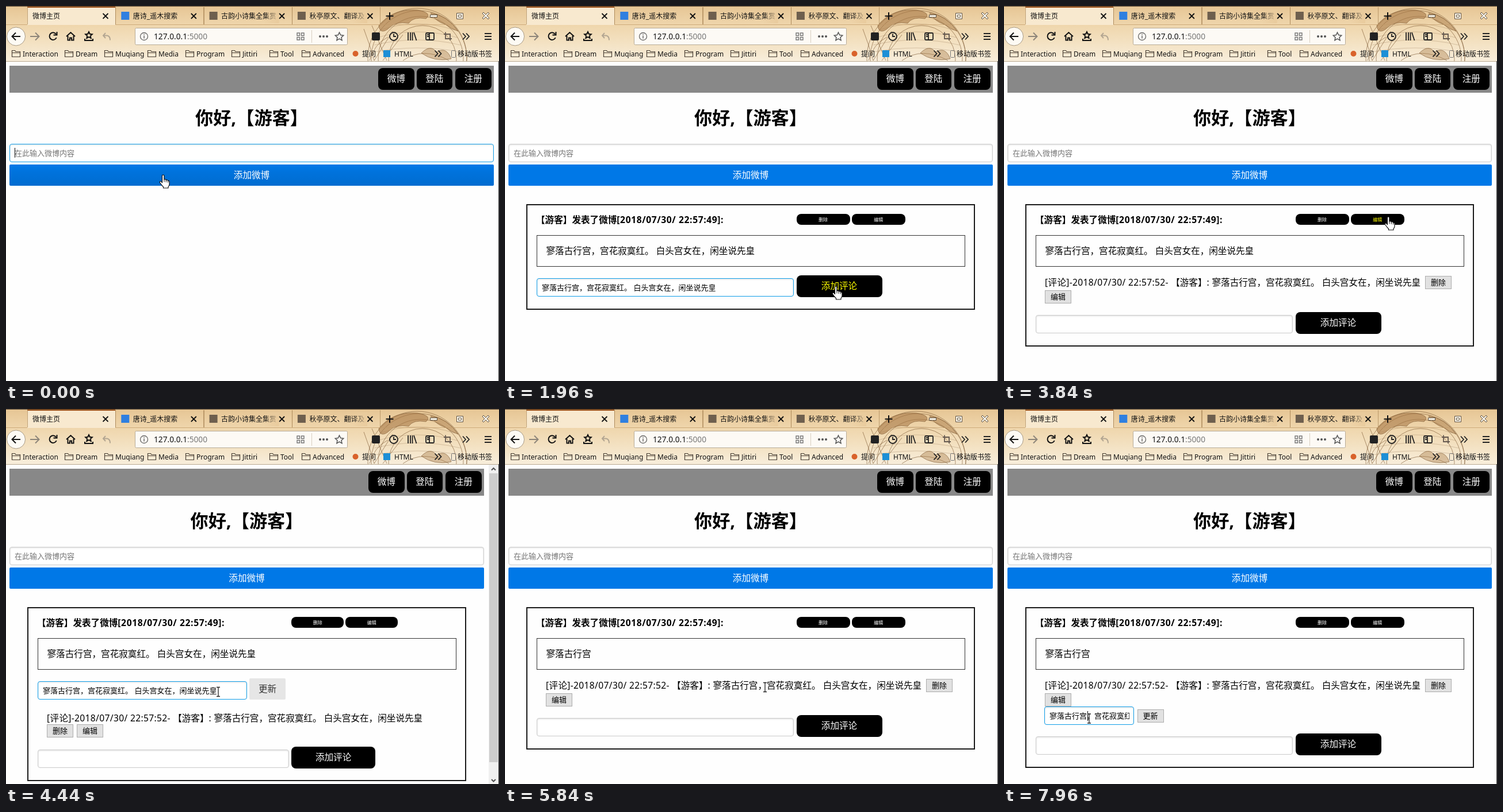
These frames come from a looping animation (857 by 653 pixels, 8 s). An HTML page:

```html
<!DOCTYPE html>
<html lang="zh-CN">
<head>
<meta charset="utf-8">
<title>微博主页</title>
<style>
html, body { margin: 0; width: 100%; height: 100%; overflow: hidden; background: #fefefe; }
body {
  position: relative; color: #000; text-spacing-trim: space-all;
  font: 15.6px "Noto Sans", "Noto Sans CJK SC", sans-serif;
}
#bar, #page, #page div, #cursor { position: absolute; box-sizing: border-box; }
#bar { left: 0; top: 0; }
#bar text { font-size: 12px; }
#page { --w: 745px; --s: 0px; --f: 0px; inset: 0; white-space: pre; }
#page .layer { inset: 0; }
#page.edit { --w: 728px; --s: -17px; }
#page.comment { --f: 64px; }
#page.comment.edit { --f: 119px; }
#page.comment.reply { --f: 96px; }

.wide { left: 6px; width: calc(842px + var(--s)); }
.btn { text-align: center; }
.black { background: #000; color: #fff; border-radius: 8px; height: 37.5px; line-height: 37px; }
.black.hover { color: #ff0; }
.menu { top: 108px; width: 62.5px; }
.mini { top: 361.5px; width: calc(var(--w) * .125); height: 19.5px; line-height: 19px; font-size: 8px; }
.field {
  height: 32px; line-height: 30px; padding-left: 8px; font-size: 13px; overflow: hidden;
  background: #fff; border: 1px solid #ccc; border-radius: 4px; box-shadow: inset 0 1px 3px #ddd;
}
.field.focus { border-color: #129fea; }
.grey {
  width: 46px; height: 23px; line-height: 20px; font-size: 13px;
  background: #e1e1e1; border: 1px solid #adadad;
}
.caret { width: 1px; height: 17px; background: #000; }
.sel { background: #0078d7; color: #fff; }

#nav { top: 104px; height: 47px; background: #888; }
#hello { top: 172px; height: 44px; line-height: 44px; font-size: 31.2px; font-weight: 700; text-align: center; }
#main { top: 239.5px; color: #757575; }
#add { top: 276px; height: 37px; line-height: 37px; color: #fff; background: #0078e7; border-radius: 2px; }
#add.hot { background-image: linear-gradient(transparent, rgba(0,0,0,.05) 40%, rgba(0,0,0,.1)); }
#card { left: 37px; top: 345px; width: calc(var(--w) + 35px); height: calc(184px + var(--f)); border: 2px solid #1a1a1a; }
#head { left: 54px; top: 360px; line-height: 25px; font-weight: 700; }
#head span { letter-spacing: .6px; }
#body { left: 55px; top: 399px; width: var(--w); height: 55px; line-height: 53px; padding-left: 15.5px; border: 1px solid #333; }
#note { left: 71px; top: 469px; line-height: 25px; }
#note span { letter-spacing: .33px; }
.edit #note { top: 525.5px; }
#del { left: 732px; top: 470px; }
#mod { left: 71px; top: 494.5px; }
.edit #del { left: 71px; top: 549px; }
.edit #mod { left: 123px; top: 549px; }
#say { left: 55px; top: calc(474px + var(--f)); width: calc(var(--w) * .6); }
#send { left: calc(59.5px + var(--w) * .6); top: calc(469px + var(--f)); width: calc(var(--w) * .2); }
#text { left: 55px; top: 474px; width: calc(var(--w) * .5); }
#save { left: 423px; top: 469px; width: 63px; height: 37px; line-height: 37px; background: #e6e6e6; color: #333; border-radius: 2px; }
#answer { left: 70px; top: 518px; width: 156px; }
#answer span { display: block; width: 139px; overflow: hidden; }
#keep { left: 231.5px; top: 523px; }
#scroll { left: 839px; top: 97px; width: 17px; height: 556px; background: #f0f0f0; }
#thumb { left: 1px; top: 15px; width: 15px; height: 503px; background: #cdcdcd; }
#scroll svg { position: absolute; left: 0; top: 0; }
#edge { left: 856px; top: 96px; width: 1px; height: 557px; background: #3b3b3b; }

#cursor { left: 0; top: 0; width: 30px; height: 30px; overflow: visible; }
#cursor g { display: none; }
#cursor.a .a, #cursor.h .h, #cursor.i .i { display: block; }
[hidden] { display: none !important; }
</style>
</head>
<body>
<svg id="bar" width="857" height="97" fill="none" stroke="none">
  <defs>
    <linearGradient id="paper" x2="0" y2="1">
      <stop stop-color="#e6c594"/><stop offset=".34" stop-color="#efd6ac"/>
      <stop offset=".7" stop-color="#f4e3c5"/><stop offset="1" stop-color="#f8eedc"/>
    </linearGradient>
    <linearGradient id="fade">
      <stop stop-color="#e9cb9d" stop-opacity="0"/><stop offset="1" stop-color="#e9cb9d"/>
    </linearGradient>
  </defs>
  <rect width="857" height="97" fill="url(#paper)"/>
  <g id="globe" stroke="#7a5530" stroke-opacity=".6">
    <path d="M648 34Q672 4 715 7Q742 12 730 22Q708 18 700 30Q676 26 664 40Q650 50 648 34Z" fill="#a87a48" fill-opacity=".6"/>
    <path d="M738 12Q768 16 786 44Q774 40 764 32Q748 28 738 12Z" fill="#a87a48" fill-opacity=".5"/>
    <path d="M622 40Q632 66 640 95M636 34L662 95M632 95Q640 66 664 54M640 95L672 44M655 95L690 50M690 95Q725 70 770 95"/>
    <path d="M722 82Q738 66 748 80Q766 70 774 92Q744 98 722 82Z" fill="#a87a48" fill-opacity=".4"/>
  </g>
  <rect y="0" width="857" height="1" fill="#5a4630"/>
  <rect x="37" y="1" width="153" height="32" fill="#f8e9cf"/>
  <rect x="37" y="1" width="153" height="2" fill="#a0561f"/>
  <path d="M0 32.5H37M190 32.5H857" stroke="#c09a68" stroke-opacity=".7"/>
  <g id="tabs"></g>
  <path d="M667 11v13M660.500 17.500h13" stroke="#111" stroke-width="2"/>
  <g stroke="#5c5043" fill="#fff8ea">
    <rect x="737.5" y="15.500" width="12" height="4"/>
    <path d="M783.500 12.500h11v10h-11zM786.500 15.500h5v4h-5z"/>
    <path d="M828 13l2-2 4 4 4-4 2 2-4 4 4 4-2 2-4-4-4 4-2-2 4-4z"/>
  </g>
  <circle cx="17.500" cy="53" r="16" fill="#fdfaf4" stroke="#a89a85"/>
  <g stroke="#111" stroke-width="2">
    <path d="M25 53H11M17 46.500L10.500 53l6.500 6.500"/>
    <path d="M42 53h14M51 46.500l6.500 6.500-6.500 6.500" stroke="#8d8579"/>
    <path d="M87 49a6.300 6.300 0 1 0 .7 6M88.500 45v5.500h-6"/>
    <path d="M105 53l7.500-7 7.500 7M107.500 52v7.500h3.500v-4h3v4h3.500V52"/>
    <path d="M137 57v3h14v-3"/>
    <path d="M144 45l1.800 3.700 4 .5-3 2.800.8 4-3.600-2-3.600 2 .8-4-3-2.800 4-.5z"/>
    <path d="M173 47l-4 4.500 4 4.500M170 51.500h6q5 1 5 8" stroke="#b3a692"/>
  </g>
  <rect x="224.500" y="38.500" width="369" height="29" rx="2" fill="#fdfaf5" stroke="#b7ab98"/>
  <circle cx="240" cy="53" r="6.500" stroke="#666" stroke-width="1.300"/>
  <path d="M240 51.500v5M240 48.700v1.500" stroke="#666" stroke-width="1.500"/>
  <text x="257" y="58" fill="#111" style="font-size:13.7px">127.0.0.1<tspan fill="#777">:5000</tspan></text>
  <path d="M506 47h4.500v4.500H506zM513.500 47h4.500v4.500h-4.500zM506 54.500h4.500V59H506zM513.500 54.500h4.500V59h-4.500z" stroke="#777" stroke-width="1.400"/>
  <path d="M531.500 42v22" stroke="#d8cfc0"/>
  <g fill="#555"><circle cx="546" cy="53" r="2"/><circle cx="552" cy="53" r="2"/><circle cx="558" cy="53" r="2"/></g>
  <path d="M579.500 46l2.200 4.600 5 .6-3.700 3.500 1 5-4.500-2.500-4.500 2.500 1-5-3.700-3.500 5-.6z" stroke="#555" stroke-width="1.500"/>
  <rect x="636" y="46" width="14" height="14" rx="2" fill="#222"/>
  <g stroke="#222" stroke-width="1.800">
    <circle cx="674" cy="53" r="7"/><path d="M674 48.500V53h4"/>
    <path d="M699 46v14M703 46v14M706.500 46v14M709 46l4.500 14"/>
    <rect x="730" y="47" width="14" height="12" rx="1.500"/><path d="M736 47v12M732 50h3M732 53h3"/>
    <path d="M764 45.500V57h11M761 49h11v11" stroke="#665a50"/>
    <path d="M794 47.500l5 5.500-5 5.500M800 47.500l5 5.500-5 5.500M832 48h12M832 53h12M832 58h12"/>
    <path d="M745.500 77.500l5 5.500-5 5.500M751.500 77.500l5 5.500-5 5.500"/>
  </g>
  <g id="marks" fill="#111"></g>
  <circle cx="607.500" cy="83" r="5" fill="#d9622b"/>
  <rect x="656" y="77" width="12" height="12" fill="#1d8fd6"/>
  <rect x="774.500" y="77.500" width="7" height="12" rx="1" stroke="#777"/>
  <path d="M0 96.500H857" stroke="#b9a98f"/>
</svg>

<div id="page">
  <div id="nav" class="wide"></div>
  <div class="btn black menu" style="left:calc(647px + var(--s))">微博</div>
  <div class="btn black menu" style="left:calc(713.5px + var(--s))">登陆</div>
  <div class="btn black menu" style="left:calc(781px + var(--s))">注册</div>
  <div id="hello" class="wide">你好,【游客】</div>
  <div id="main" class="wide field">在此输入微博内容</div>
  <div id="mainCaret" class="caret" style="left:15px;top:247px"></div>
  <div id="add" class="wide btn">添加微博</div>
  <div id="post" class="layer">
    <div id="card"></div>
    <div id="head">【游客】发表了微博<span>[2018/07/30/ 22:57:49]:</span></div>
    <div class="btn black mini" style="left:calc(59.5px + var(--w) * .6)">删除</div>
    <div id="change" class="btn black mini" style="left:calc(62.5px + var(--w) * .725)">编辑</div>
    <div id="body"></div>
    <div id="editor" class="layer">
      <div id="text" class="field"><span></span><span class="sel"></span></div>
      <div id="save" class="btn">更新</div>
    </div>
    <div id="reply" class="layer">
      <div id="note"></div>
      <div id="del" class="btn grey">删除</div>
      <div id="mod" class="btn grey">编辑</div>
    </div>
    <div id="fix" class="layer">
      <div id="answer" class="field"><span></span></div>
      <div id="fixCaret" class="caret" style="left:145px;top:526px"></div>
      <div id="keep" class="btn grey">更新</div>
    </div>
    <div id="say" class="field"></div>
    <div id="send" class="btn black">添加评论</div>
  </div>
  <div id="scroll">
    <div id="thumb"></div>
    <svg width="17" height="556" fill="none" stroke="#505050" stroke-width="2"><path d="M5 9.500l3.500-3.500 3.500 3.500M5 548l3.500 3.500 3.500-3.500"/></svg>
  </div>
  <div id="edge"></div>
</div>

<svg id="cursor">
  <g class="a"><path d="M.5.5v16l3.700-3.400 2.500 5.600 2.300-1-2.500-5.500h5z" fill="#fff" stroke="#222"/></g>
  <g class="h"><path d="M-1.500 14V2q0-2 1.700-2t1.700 2v6q3-.8 3.300 1 3-.6 3.200 1.200 2.600-.3 2.600 1.800v4.500q0 2-2 4.500V23H.5v-2q-3-3-6-7.500-.8-1.700.8-2.200 1.600-.3 3.200 2.700z" fill="#fff" stroke="#111" stroke-width="1.200"/><path d="M2 8v4.500M5.300 9v4M8.500 10.500v3" stroke="#111"/></g>
  <g class="i"><path d="M-3-7.500h2.500l.5.500.5-.5H3M-3 8.500h2.500L0 8l.5.500H3M0-7V8" fill="none" stroke="#222" stroke-width="1.300"/></g>
</svg>

<script>
const $ = id => document.getElementById(id);
const first = '寥落古行宫';
const poem = first + '，宫花寂寞红。 白头宫女在，闲坐说先皇';
const label = (x, y, s) => `<text x="${x}" y="${y}" fill="#111">${s}</text>`;

// Browser bar
const tabs = ['微博主页', '唐诗_遥木搜索', '古韵小诗集全集赏', '秋亭原文、翻译及'];
const icons = ['', '#2f7fe0', '#6e5f4e', '#6e5f4e'];
$('tabs').innerHTML = tabs.map((name, i) => {
  const x = 37 + i * 153.3;
  const icon = i ? `<rect x="${x + 10}" y="10" width="14" height="14" fill="${icons[i]}"/>` : '';
  const fade = i > 1 ? `<rect x="${x + 105}" y="6" width="26" height="24" fill="url(#fade)"/>` : '';
  return icon + label(x + (i ? 30.5 : 9), 21.5, name) + fade +
    `<path d="M${x + 131.5} 13l9 9m0-9l-9 9" stroke="#111" stroke-width="1.8"/>` +
    `<path d="M${Math.round(x) + .5} 2v30m153 0v-30" stroke="#a98556" stroke-opacity=".7"/>`;
}).join('');

const marks = [[9, 'Interaction'], [101, 'Dream'], [170, 'Muqiang'], [245, 'Media'],
  [311, 'Program'], [391, 'Jittiri'], [457, 'Tool'], [513, 'Advanced']];
$('marks').innerHTML = marks.map(([x, name]) =>
  `<path d="M${x + 1.5} 88.5v-11h5l1.5 2h7.5v9zM${x + 1.5} 81.5h14" fill="none" stroke="#4a4035" stroke-width="1.2"/>` +
  label(x + 20, 87.5, name)).join('') +
  label(619, 87.5, '提问') + label(675, 87.5, 'HTML') + label(785, 87.5, '移动版书签');

// Globe rims and faint latitude lines
let arcs = '';
for (let i = 0; i < 4; i++) {
  arcs += `<circle cx="${715 + i * 3}" cy="${90 + i}" r="${86 - i * i * 3}"/>`;
  arcs += `<path d="M${650 - i * 5} ${42 + i * 13}Q715 ${20 + i * 15} ${780 + i * 5} ${42 + i * 13}" stroke-opacity=".25"/>`;
}
$('globe').insertAdjacentHTML('afterbegin', arcs);

$('note').innerHTML = `<span>[评论]-2018/07/30/ 22:57:52- </span>【游客】<span>: </span>${poem}`;
$('answer').firstChild.textContent = poem;

// Pointer path: time, x, y, shape (a arrow, h hand, i text beam)
const path = [
  [0, 273, 294, 'h'], [400, 273, 294, 'h'], [520, 270, 318, 'a'], [1080, 252, 468, 'a'],
  [1160, 247, 486, 'i'], [1320, 245.5, 493.5, 'i'], [1480, 246, 494, 'i'], [1600, 300, 520, 'a'],
  [1840, 565, 490, 'h'], [1920, 575, 488, 'h'], [2120, 575, 488, 'a'], [2320, 440, 548, 'i'],
  [2360, 428, 556, 'i'], [2560, 428, 556, 'i'], [2600, 445, 517, 'a'], [2960, 834, 440, 'a'],
  [3400, 706, 384, 'a'], [3440, 706, 384, 'a'], [3560, 680, 370, 'h'], [3720, 668, 367, 'h'],
  [4000, 668, 367, 'h'], [4080, 590, 400, 'a'], [4200, 400, 485, 'i'], [4280, 380, 491, 'i'],
  [4400, 369, 492, 'i'], [4520, 369, 492, 'i'], [5000, 129, 496, 'i'], [5160, 129, 496, 'i'],
  [5240, 196, 486, 'i'], [5520, 425, 484, 'h'], [5640, 452, 484, 'h'], [5760, 452, 484, 'i'],
  [5960, 452, 484, 'a'], [6200, 690, 250, 'a'], [6360, 560, 50, 'a'], [6760, 197, 528, 'a'],
  [6800, 161, 526, 'a'], [6840, 161, 526, 'a'], [7040, 105, 500, 'h'], [7120, 92, 497, 'h'],
  [7680, 92, 497, 'h'], [7760, 112, 516, 'i'], [7920, 148, 538.5, 'i'], [8000, 148, 538.5, 'i']
];

function pointer(t) {
  const k = path.findIndex(p => p[0] > t);
  const [t0, x0, y0, shape] = path[k - 1], [t1, x1, y1] = path[k];
  const u = (t - t0) / (t1 - t0), e = u * u * (3 - 2 * u);
  return [x0 + (x1 - x0) * e, y0 + (y1 - y0) * e, shape];
}

const toggle = (id, name, on) => $(id).classList.toggle(name, on);
const show = (id, on) => { $(id).hidden = !on; };

function draw(t) {
  const between = (a, b) => t >= a && t < b;
  const [x, y, shape] = pointer(t);
  const editing = between(3960, 5760);

  toggle('page', 'comment', t >= 2120);
  toggle('page', 'edit', editing);
  toggle('page', 'reply', t >= 7240);
  show('post', t >= 320);
  show('reply', t >= 2120);
  show('editor', editing);
  show('scroll', editing);
  show('fix', t >= 7240);

  toggle('main', 'focus', t < 320);
  show('mainCaret', t < 320);
  toggle('add', 'hot', t < 1440);
  toggle('say', 'focus', between(1440, 2040));
  $('say').textContent = between(1600, 2120) ? poem : '';
  toggle('send', 'hover', between(1840, 2120));
  toggle('change', 'hover', between(3560, 4080));
  $('body').textContent = t < 5760 ? poem : first;

  toggle('text', 'focus', t >= 4400);
  const [plain, marked] = $('text').children;
  const drag = Math.round((369 - x) / 13);
  const picked = t < 4520 ? 0 : t < 5000 ? Math.min(drag, poem.length - 5) : poem.length - 5;
  const cut = poem.length - picked;
  plain.textContent = poem.slice(0, cut);
  marked.textContent = t < 5400 ? poem.slice(cut) : '';

  toggle('answer', 'focus', t >= 7880);
  show('fixCaret', t >= 7880);

  $('cursor').setAttribute('class', shape);
  $('cursor').style.transform = `translate(${x}px, ${y}px)`;
}

const start = performance.now();
function tick() {
  const t = (performance.now() - start) % 8000;
  draw(Math.floor(t / 40) * 40);
  requestAnimationFrame(tick);
}
tick();
</script>
</body>
</html>
```
